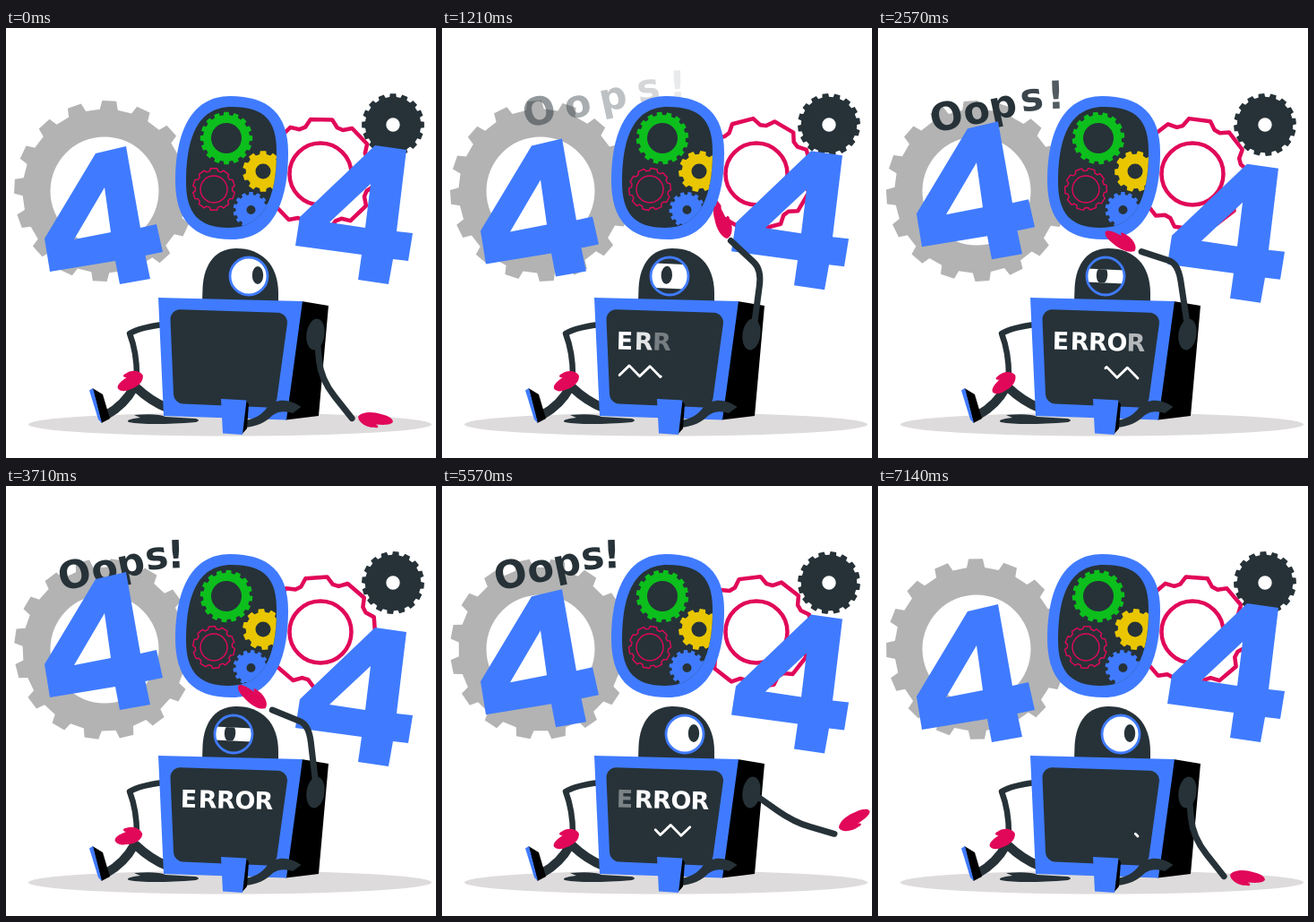
An HTML page with a canvas for the animation above (7210 ms loop, 480 px wide and 480 px high).

```html
<!DOCTYPE html>
<html lang="en">
<head>
<meta charset="utf-8">
<title>404</title>
<style>
html, body { margin: 0; width: 100%; height: 100%; overflow: hidden; background: #fff; }
canvas { display: block; width: 100vmin; height: 100vmin; }
</style>
</head>
<body>
<canvas id="stage" width="480" height="480"></canvas>
<script>
const ctx = document.getElementById('stage').getContext('2d');
const FPS = 14, FRAMES = 101, TAU = Math.PI * 2, RAD = Math.PI / 180;
const BLUE = '#407bff', DARK = '#263238', PINK = '#e10859', GRAY = '#b3b3b3',
      GREEN = '#0cbf1c', YELLOW = '#e9c600';
const FONT = '"DejaVu Sans", sans-serif';

const clamp = v => Math.max(0, Math.min(1, v));
const ramp = (t, start, end) => clamp((t - start) / (end - start));
const mix = (a, b, f) => [a[0] + (b[0] - a[0]) * f, a[1] + (b[1] - a[1]) * f];
const polar = (p, deg, r) => [p[0] + Math.cos(deg * RAD) * r, p[1] + Math.sin(deg * RAD) * r];

// Smooth monotone interpolation through rows of [time, ...values]
function track(keys, t) {
  const last = keys.length - 1;
  let i = 0;
  while (i < last - 1 && t > keys[i + 1][0]) i++;
  const slope = (k, j) => (keys[k + 1][j] - keys[k][j]) / (keys[k + 1][0] - keys[k][0]);
  const tangent = (k, j) => {
    if (k === 0 || k === last) return 0;
    const a = slope(k - 1, j), b = slope(k, j);
    return a * b <= 0 ? 0 : 2 * a * b / (a + b);
  };
  const a = keys[i], b = keys[i + 1], span = b[0] - a[0];
  const u = clamp((t - a[0]) / span), v = 1 - u;
  return a.slice(1).map((from, n) => {
    const j = n + 1;
    return from * v * v * (1 + 2 * u) + b[j] * u * u * (3 - 2 * u)
      + span * u * v * (tangent(i, j) * v - tangent(i + 1, j) * u);
  });
}

function fill(color, d) {
  ctx.fillStyle = color;
  ctx.fill(new Path2D(d), 'evenodd');
}

function stroke(color, width, d) {
  ctx.strokeStyle = color;
  ctx.lineWidth = width;
  ctx.stroke(new Path2D(d));
}

function oval(color, x, y, rx, ry, deg = 0) {
  ctx.fillStyle = color;
  ctx.beginPath();
  ctx.ellipse(x, y, rx, ry, deg * RAD, 0, TAU);
  ctx.fill();
}

function ring(color, width, x, y, r) {
  ctx.strokeStyle = color;
  ctx.lineWidth = width;
  ctx.beginPath();
  ctx.arc(x, y, r, 0, TAU);
  ctx.stroke();
}

function at(x, y, deg, draw) {
  ctx.save();
  ctx.translate(x, y);
  ctx.rotate(deg * RAD);
  draw();
  ctx.restore();
}

// top and base are half widths of a tooth, as shares of the pitch
function gear({ x, y, teeth, outer, inner, hole, color, line = 0, top = .2, base = .28 }, deg) {
  const pitch = 360 / teeth, path = new Path2D();
  for (let i = 0; i < teeth; i++) {
    const mid = i * pitch + deg - 90;
    for (const [share, r] of [[-base, inner], [-top, outer], [top, outer], [base, inner]]) {
      path.lineTo(...polar([x, y], mid + share * pitch, r));
    }
  }
  path.closePath();
  if (line) {
    ctx.strokeStyle = color;
    ctx.lineWidth = line;
    ctx.stroke(path);
    ring(color, line, x, y, hole);
    return;
  }
  path.moveTo(x + hole, y);
  path.arc(x, y, hole, 0, TAU);
  ctx.fillStyle = color;
  ctx.fill(path, 'evenodd');
}

const gears = {
  big: { x: 110, y: 182, teeth: 16, outer: 101, inner: 91.5, hole: 60.5, color: GRAY },
  outline: { x: 351, y: 163, teeth: 8, outer: 62, inner: 55, hole: 34.5, color: PINK, line: 4.5, top: .25, base: .42 },
  dark: { x: 432, y: 108, teeth: 16, outer: 35, inner: 31.2, hole: 7.7, color: DARK, top: .24, base: .31 },
  green: { x: 246, y: 123, teeth: 16, outer: 29.3, inner: 26, hole: 17, color: GREEN, top: .24, base: .31 },
  yellow: { x: 287, y: 160, teeth: 10, outer: 23, inner: 19.3, hole: 8.5, color: YELLOW, top: .22, base: .32 },
  thin: { x: 232, y: 180, teeth: 10, outer: 23.5, inner: 20.7, hole: 15, color: PINK, line: 1.4, top: .25, base: .36 },
  blue: { x: 273.5, y: 203, teeth: 14, outer: 20, inner: 17, hole: 5, color: BLUE, top: .23, base: .31 }
};

const LEFT_FOUR = 'M100 140L134 132L150 223L168 219L175 250L155.5 254L161 280L127 286L122 260L49 272L43 235Z'
  + 'M110 178L117 228L76 236Z';
const RIGHT_FOUR = 'M412 131L447 136L436 227L454 229L449 260L432 258L427 286L393 281L397 253L323 243L328 211Z'
  + 'M407 174L401 223L361 217Z';
const ZERO = 'M250 76C293 76 315 96 315 139C315 194 298 236 252 236C208 236 189 214 189 170C189 120 205 76 250 76Z';
const ZERO_INSIDE = 'M252 88C289 88 302 104 302 138C302 189 288 223 249 223C215 223 201 207 201 172C201 126 212 88 252 88Z';
const HAND = 'M-19 -3C-14 -9 -2 -9 6 -7C14 -6 20 -3 20 1C18 5 8 5 1 5C6 7 4 9.5 -1 8.5C-10 9 -20 3 -19 -3Z';

// letter, x, baseline, tilt
const OOPS = [['O', 80, 113, -14], ['o', 113, 106.5, -13], ['p', 142, 100, -12], ['s', 170, 92.5, -8], ['!', 190, 91.5, -2]];
// letter, x, fade-in start, fade-out start
const ERROR = [['E', 194.6, .05, 5.15], ['R', 214.6, .25, 5.55], ['R', 234.8, .8, 5.85], ['O', 255.2, 1.3, 6.1], ['R', 277.2, 1.85, 6.35]];

// time, upper angle and length, forearm angle and length, hand angle and reach, bend
const REST = [85, 49, 51.5, 56, 4, 26, .45];
const ARM = [
  [.05, ...REST],
  [.8, 10, 60, -15, 49, -30, 26, .4],
  [1.21, -82.2, 74, -136.7, 47, -113, 23, .25],
  [1.7, -97, 79, -157, 44, -150, 25, .25],
  [2.57, -98.5, 81, -162, 43, -152, 26, .25],
  [3.71, -96.7, 77, -158, 44, -145, 26.5, .25],
  [4.5, -91.5, 81, -157.5, 44, -166, 26, .25],
  [5.57, 35, 56, 16, 47, -34, 27, .4],
  [6.15, ...REST]
];
// time, centre x, pupil offset, half opening
const EYE = [
  [.3, 271, 10, 24], [.8, 259, 1, 22], [1.15, 254, -3, 15], [1.6, 254, -4, 7.5],
  [3.9, 254, -4, 7.5], [4.5, 259, -2, 8.5], [5.2, 271, 10, 24]
];
const TAP = [[.9, 145], [1.3, 144], [2.2, 134], [2.57, 135], [3.4, 161], [3.71, 159], [4.35, 134], [5.4, 145]];

// Slow drift of the fours: 0 at both ends of the loop, 1 at the peak
function drift(t) {
  const peak = 3.78, end = FRAMES / FPS;
  const u = t < peak ? t / peak : (end - t) / (end - peak);
  return (1 - Math.cos(Math.PI * u)) / 2;
}

function drawOops(t) {
  ctx.font = `700 43px ${FONT}`;
  ctx.textAlign = 'center';
  ctx.fillStyle = DARK;
  OOPS.forEach(([ch, x, y, tilt], i) => {
    const start = .24 + i * .195;
    const p = ramp(t, start, start + 1.94);
    const out = ramp(t, 5.65 + i * .13, 6.35 + i * .13);
    const away = Math.pow(1 - p, 1.4);
    ctx.globalAlpha = p * (1 - out);
    at(x + 85 * away, y - 15 * away, tilt, () => ctx.fillText(ch, 0, 0));
  });
  ctx.globalAlpha = 1;
}

function drawDigits(t, turn) {
  const shift = drift(t);
  at(0, -36 * shift, 0, () => fill(BLUE, LEFT_FOUR));
  at(0, 27 * shift, 0, () => fill(BLUE, RIGHT_FOUR));
  fill(BLUE, ZERO);
  fill(DARK, ZERO_INSIDE);
  ctx.save();
  ctx.clip(new Path2D(ZERO_INSIDE));
  gear(gears.green, turn);
  gear(gears.yellow, -turn);
  gear(gears.thin, -turn);
  gear(gears.blue, turn);
  ctx.restore();
}

function drawEye(t) {
  const [x, pupil, open] = track(EYE, t);
  const y = 277;
  ctx.save();
  ctx.beginPath();
  ctx.arc(x, y, 21, 0, TAU);
  ctx.clip();
  at(x, y, open < 20 ? 3 : 0, () => {
    ctx.beginPath();
    ctx.rect(-26, -open, 52, open * 2);
    ctx.clip();
    ctx.fillStyle = '#fff';
    ctx.fillRect(-26, -26, 52, 52);
    oval(DARK, pupil, -1, 6.2, 10);
  });
  ctx.restore();
  ring(BLUE, 2.8, x, y, 21);
}

function drawZigzag(t) {
  const head = t < 3.6 ? ramp(t, .1, 2.3) : ramp(t, 3.78, 5.87);
  const tail = t < 3.6 ? ramp(t, 1.2, 3.45) : ramp(t, 4.27, 7.23);
  if (head <= tail) return;
  const step = 1 / 8;
  const point = f => {
    const i = Math.min(7, Math.floor(f / step)), u = f / step - i;
    const height = i % 2 ? u : 1 - u;
    return [197.5 + f * 92.5, 376.5 + height * 11.5 + f * 3];
  };
  ctx.beginPath();
  ctx.moveTo(...point(tail));
  for (let i = 1; i < 8; i++) if (i * step > tail && i * step < head) ctx.lineTo(...point(i * step));
  ctx.lineTo(...point(head));
  ctx.strokeStyle = '#fff';
  ctx.lineWidth = 2.8;
  ctx.stroke();
}

function drawScreen(t) {
  const glass = 'M194.5 325.3L303 328.8L291.5 412.5L198 408.5Z';
  fill(DARK, glass);
  stroke(DARK, 22, glass);
  ctx.font = `700 27px ${FONT}`;
  ctx.textAlign = 'left';
  ctx.fillStyle = '#fff';
  ERROR.forEach(([ch, x, on, off], i) => {
    ctx.globalAlpha = ramp(t, on, on + 1.1) * (1 - ramp(t, off, off + .7));
    at(x, 358.5 + i * .5, 1.4, () => ctx.fillText(ch, 0, 0));
  });
  ctx.globalAlpha = 1;
  drawZigzag(t);
}

function drawLeftSide(t) {
  fill(DARK, 'M143 432Q170 430 178 434L212 436Q218 438 212 440Q160 444 137 440Q132 437 150 435Z');
  stroke(DARK, 10, 'M180 424Q162 417 145 401');
  stroke(DARK, 10, 'M143 401Q132 421 112 432');
  fill('#000', 'M96.5 402L108 409L116 436L106.5 441Z');
  fill(BLUE, 'M93 404.5L97 402L107 441L103 437Z');
  stroke(DARK, 6.5, 'M176 331Q150 334 138 341Q146 362 146 388');
  at(150, 386, track(TAP, t)[0], () => {
    ctx.translate(14, 0);
    ctx.scale(.8, 1.12);
    fill(PINK, HAND);
  });
}

function drawRightArm(t) {
  const [upper, upperLen, fore, foreLen, hand, reach, bend] = track(ARM, t);
  const shoulder = [347, 343];
  const elbow = polar(shoulder, upper, upperLen);
  const wrist = polar(elbow, fore, foreLen);
  const palm = polar(wrist, hand, reach);
  oval(DARK, 345.5, 342, 10, 17.5, 8);
  ctx.strokeStyle = DARK;
  ctx.lineWidth = 7;
  ctx.beginPath();
  ctx.moveTo(...shoulder);
  ctx.lineTo(...mix(elbow, shoulder, bend));
  ctx.quadraticCurveTo(...elbow, ...mix(elbow, wrist, bend));
  ctx.lineTo(...wrist);
  ctx.stroke();
  at(...palm, hand, () => fill(PINK, HAND));
}

function drawRobot(t) {
  drawLeftSide(t);
  fill(DARK, 'M219 306L219.5 290C221 262 235 246 257 246C285 246 304 264 304 296L304 308Z');
  drawEye(t);
  fill('#000', 'M330 305L360 310L349 433L312 437.5Z');
  fill(BLUE, 'M170 301L331 305L313 437.5L176 433Z');
  drawScreen(t);
  fill(DARK, 'M329.5 423C318 415 303 412 292 423C285 433 275 437 266 438L266 446C280 445 290 440 298 432C306 427 313 428 320 430Z');
  fill('#000', 'M267 415L271 420L269 447L263 454Z');
  fill(BLUE, 'M240 414L268.5 415.5L264 454L242 452.5Z');
  drawRightArm(t);
}

function render() {
  const frame = Math.floor((performance.now() % 7210 + 5) * FPS / 1000) % FRAMES;
  const t = frame / FPS;
  const turn = frame * 360 / FRAMES;
  ctx.fillStyle = '#fff';
  ctx.fillRect(0, 0, 480, 480);
  ctx.lineCap = ctx.lineJoin = 'round';
  oval('#dedbdc', 250, 442.5, 225, 13);
  gear(gears.big, turn + 3);
  gear(gears.outline, 1 - turn);
  gear(gears.dark, turn);
  drawOops(t);
  drawDigits(t, turn);
  drawRobot(t);
  requestAnimationFrame(render);
}
render();
</script>
</body>
</html>
```
